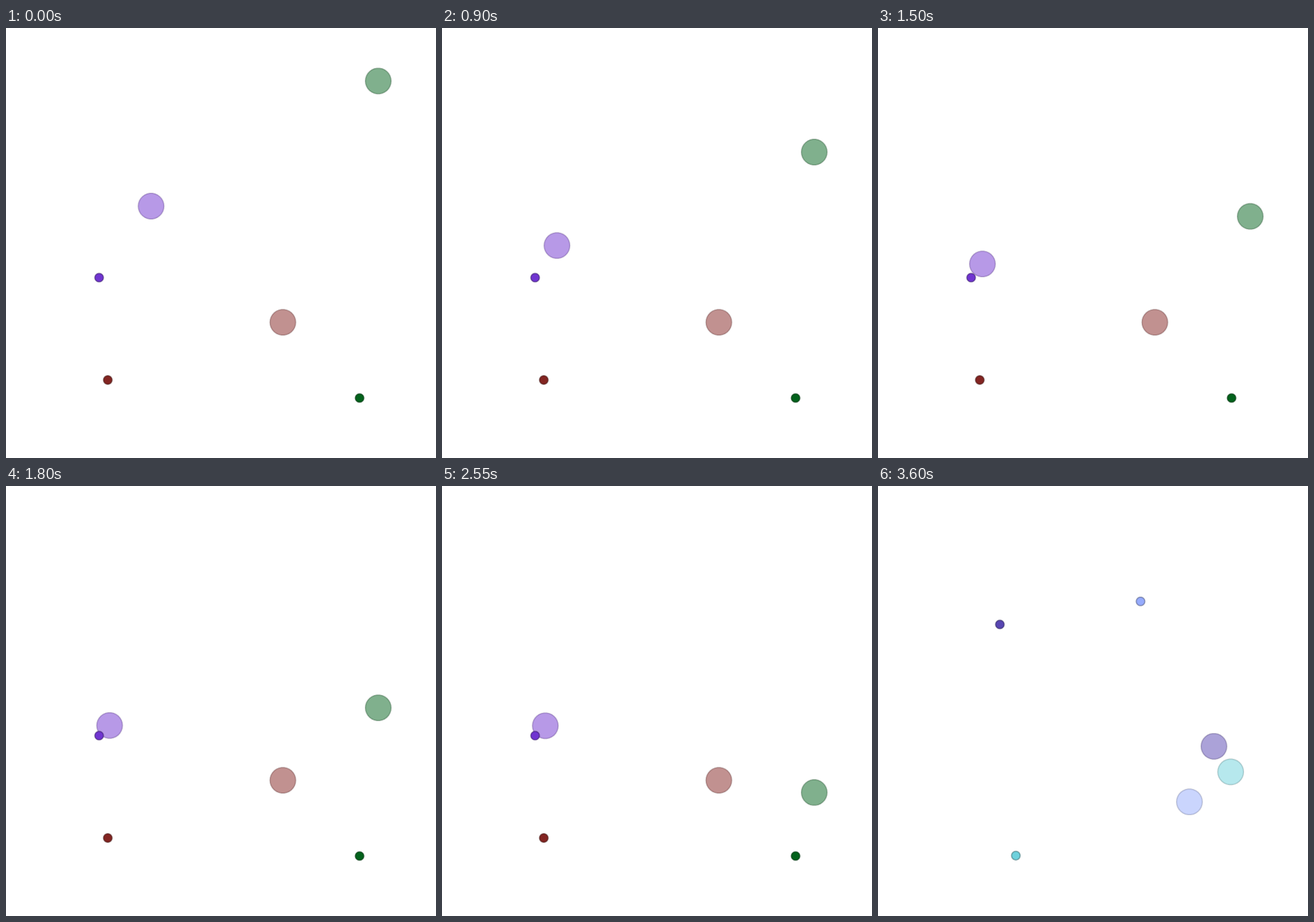
An HTML page with a canvas that plays this animation: 700x700 px, repeating every 3.75 s.

```html
<!DOCTYPE html>
<html lang="en">
<head>
<meta charset="utf-8">
<style>
  html, body { margin: 0; width: 100%; height: 100%; overflow: hidden; background: #fff; }
  canvas { display: block; }
</style>
</head>
<body>
<canvas id="stage" width="700" height="700"></canvas>
<script>
const ctx = document.getElementById("stage").getContext("2d");
const STEP_MS = 150, STEPS = 25, SWITCH_STEP = 24, TURN_STEP = 19;
const { PI, min, max, sin, cos, exp } = Math;

const easeInOut = u => (1 - cos(PI * min(max(u, 0), 1))) / 2;

// Glides towards its goal, then hovers beside it.
function violetAgent(step) {
  const settle = max(step - 10, 0);
  const sway = step > 9 ? 3 * sin(PI * (step - 9) / 12) : 0;
  const bounce = 6.4 * (1 - cos(PI * settle / 4.5) * exp(-settle / 4));
  return [
    236.2 - 65.4 * easeInOut(step / 9) - sway,
    290 + 94.1 * easeInOut(step / 9.7) + bounce
  ];
}

// Speeds up to a steady fall, then brakes and curves left past its goal.
function greenAgent(step) {
  const fall = min(step, TURN_STEP), turn = max(step - TURN_STEP, 0);
  return [
    606 - 2.7 * turn ** 2,
    86.3 + 27.8 * fall - 60.2 * (1 - exp(-0.315 * fall)) + 24.5 * turn - 2.45 * turn ** 2
  ];
}

const firstRound = step => [
  { rgb: [112, 53, 208], goal: [151.6, 406.4], agent: violetAgent(step) },
  { rgb: [131, 37, 34], goal: [165.7, 573], agent: [450.7, 479.1] },
  { rgb: [3, 98, 28], goal: [575.6, 602.4], agent: greenAgent(step) }
];
const secondRound = [
  { rgb: [88, 70, 178], goal: [198.4, 225.4], agent: [546.9, 423.8] },
  { rgb: [150, 171, 252], goal: [427.4, 187.9], agent: [507, 514.2] },
  { rgb: [110, 209, 220], goal: [224.4, 601.7], agent: [574.1, 465.4] }
];

// A 30-sided disc whose outline has half the colour and half the opacity.
function disc([x, y], radius, rgb, alpha) {
  ctx.beginPath();
  for (let i = 0; i < 30; i++) {
    const angle = 2 * PI * i / 30;
    ctx.lineTo(x + radius * cos(angle), y + radius * sin(angle));
  }
  ctx.closePath();
  ctx.fillStyle = `rgba(${rgb},${alpha})`;
  ctx.fill();
  ctx.strokeStyle = `rgba(${rgb.map(c => c / 2)},${alpha / 2})`;
  ctx.lineWidth = 2;
  ctx.stroke();
}

function draw(now) {
  const step = Math.floor(now / STEP_MS) % STEPS;
  const pairs = step < SWITCH_STEP ? firstRound(step) : secondRound;
  ctx.clearRect(0, 0, 700, 700);
  for (const { agent, rgb } of pairs) disc(agent, 21, rgb, 0.5);
  for (const { goal, rgb } of pairs) disc(goal, 7, rgb, 1);
}

const start = performance.now();
function tick() {
  draw(performance.now() - start);
  requestAnimationFrame(tick);
}
tick();
</script>
</body>
</html>
```
